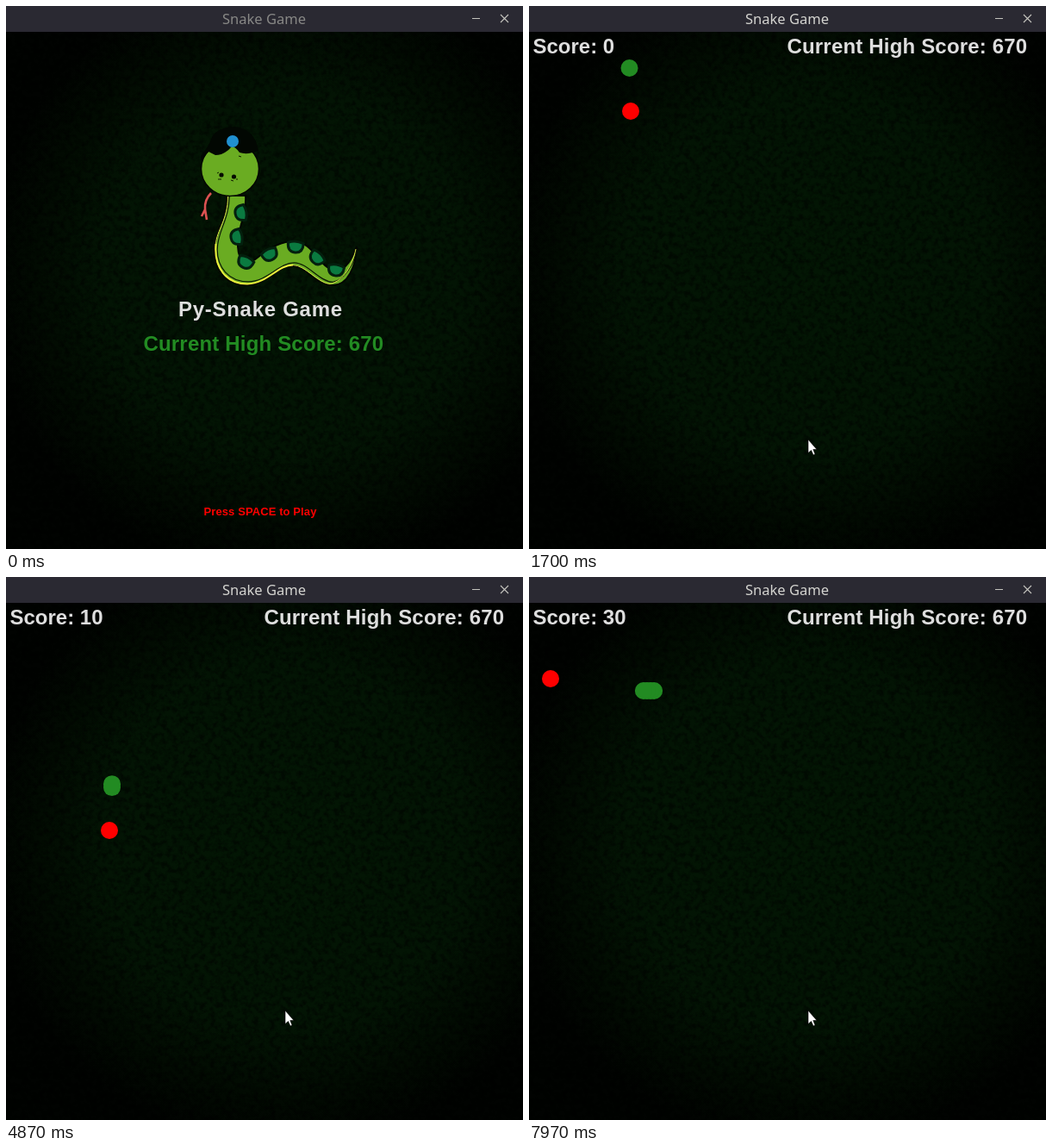
Animation of 600 by 630 pixels, one loop 8000 ms. Source, as an HTML page:

```html
<!DOCTYPE html>
<html lang="en">
<head>
<meta charset="utf-8">
<title>Snake Game</title>
<style>
  html, body { margin: 0; width: 100%; height: 100%; overflow: hidden; background: #000; }
  svg { display: block; width: 100%; height: 100%; }
  text { font: bold 24px "Liberation Sans", Arial, sans-serif; fill: #dedede; }
  #caption { font: 16.5px "Noto Sans", "Open Sans", sans-serif; }
  #prompt { font-size: 13px; letter-spacing: .1px; fill: #f00; }
  .high { letter-spacing: .18px; }
</style>
</head>
<body>
<svg viewBox="0 0 600 630" xmlns="http://www.w3.org/2000/svg">
  <defs>
    <radialGradient id="glow" gradientUnits="userSpaceOnUse" cx="325" cy="310" r="350">
      <stop offset="0" stop-color="#031604"/>
      <stop offset=".6" stop-color="#031404"/>
      <stop offset=".82" stop-color="#020b02"/>
      <stop offset="1" stop-color="#010301"/>
    </radialGradient>
    <filter id="grain" x="0" y="0" width="100%" height="100%" color-interpolation-filters="sRGB">
      <feTurbulence type="fractalNoise" baseFrequency=".16" numOctaves="4" seed="7"/>
      <feColorMatrix values="0 0 0 0 0  0 0 0 0 0  0 0 0 0 0  3 0 0 0 -1.25"/>
    </filter>
  </defs>

  <rect width="600" height="630" fill="#000"/>
  <rect y="30" width="600" height="600" fill="url(#glow)"/>
  <rect y="30" width="600" height="600" filter="url(#grain)" opacity=".5"/>

  <rect width="600" height="30" fill="#2a2932"/>
  <text id="caption" x="299.5" y="21" text-anchor="middle">Snake Game</text>
  <path d="M541 14.5h9M574 10l9 9M583 10l-9 9" fill="none" stroke="#c4c4be" stroke-width="1.1"/>

  <g id="menu">
    <path d="M238 217Q230 225 231 236L227 244M231 236L233 248" fill="none" stroke="#dc5252" stroke-width="2.6"/>
    <path d="M257 220L278 220C280 242 268 258 269 279C270 297 279 303 293 291C307 279 321 273 335 273C357 274 364 305 382 307C395 307 402 292 407 279C406 302 397 324 379 324C360 324 348 302 333 301C315 301 303 324 279 324C255 324 242 306 242 285C242 260 257 248 257 220Z" fill="#6aac22" stroke="#020602" stroke-width="2"/>
    <g fill="none">
      <path d="M258 221C258 250 244 262 244 284C244 304 257 321 280 321C302 321 316 299 333 299C349 299 362 321 378 321.500C392 319 402 301 406 284" stroke="#0c1a04" stroke-width="1.2" transform="translate(1.2 -1.2)"/>
      <path d="M243.500 276C241 304 256 322.500 280 322.500C303 322 316 300.500 333 300.500" stroke="#ecec3c" stroke-width="2"/>
      <path d="M257.500 221C257.500 248 244.500 260 243.500 276M333 300.500C348 301 361 321 376 322.500C392 319 402 301 406 282" stroke="#d8e048" stroke-width="1"/>
    </g>
    <g id="spots" fill="#0a7a40" stroke="#04200e" stroke-width="3"></g>
    <ellipse cx="260" cy="189" rx="33.500" ry="31.500" fill="#6aac22" stroke="#020602" stroke-width="1.500"/>
    <path d="M226 174Q235 164 240 150Q249 140 266 140Q289 143 293 168Q280 173 271 170Q266 163 262 163Q254 173 243 173L235 169L226 180Z" fill="#020702"/>
    <circle cx="263" cy="157" r="7" fill="#2090d0"/>
    <g fill="#060c00">
      <circle cx="250" cy="196" r="2.600"/>
      <circle cx="264.500" cy="198" r="2.600"/>
    </g>
    <path d="M246 201l4 0M261 202l3 1M270 174l3 1M245 194l2-1M267 201l2 0" stroke="#101c00"/>
    <text x="200" y="360" style="letter-spacing:.72px">Py-Snake Game</text>
    <text class="high" x="159.500" y="400" style="fill:#228b22">Current High Score: 670</text>
    <text id="prompt" x="229.500" y="591">Press SPACE to Play</text>
  </g>

  <g id="game">
    <text id="score" x="4.500" y="55"></text>
    <text class="high" x="299.500" y="55">Current High Score: 670</text>
    <g id="snake" fill="#228b22"></g>
    <circle id="food" r="10" fill="#f00"/>
  </g>

  <path id="cursor" d="M324 503V518.500L327.500 515.500L330 521L332 520L329.800 514.500H334Z" fill="#fff" stroke="#000" stroke-width=".6"/>
</svg>
<script>
const LOOP = 8000, FOCUS = 500, START = 1200, LAG = 32;

// Head turns: time, x, y
const path = [
  [1200, 55, 72], [2470, 211, 72], [2616, 229, 72], [2860, 229, 102], [3670, 129, 102],
  [3719, 123, 102], [4870, 123, 244], [5727, 123, 350], [5897, 102, 350],
  [6730, 102, 247], [7633, 102, 132], [7970, 145, 132], [8000, 149, 132]
];
// Each fruit: time it appears, x, y
const fruit = [[1200, 118, 122], [3770, 120, 294], [5165, 101, 119], [7630, 25, 118]];
// Each spot on the back: x, y, turn in degrees
const spots = [[273, 240, 80], [268, 268, 80], [278, 297, 25], [306, 288, -25], [336, 279, 5], [361, 292, 45], [383, 306, 10]];

const $ = id => document.getElementById(id);
const show = (el, on) => el.setAttribute("display", on ? "inline" : "none");

function add(parent, name, attrs) {
  const el = document.createElementNS("http://www.w3.org/2000/svg", name);
  for (const key in attrs) el.setAttribute(key, attrs[key]);
  return parent.appendChild(el);
}

function place(el, x, y) {
  el.setAttribute("cx", x);
  el.setAttribute("cy", y);
}

function headAt(t) {
  if (t <= START) return path[0].slice(1);
  const i = path.findIndex(p => p[0] > t);
  const [t0, x0, y0] = path[i - 1], [t1, x1, y1] = path[i];
  const k = (t - t0) / (t1 - t0);
  return [x0 + (x1 - x0) * k, y0 + (y1 - y0) * k];
}

for (const [x, y, turn] of spots) {
  const d = "M-9 -4Q-9 7 0 7Q9 7 9 -4Q0 -8 -9 -4Z";
  add($("spots"), "path", { d, transform: `translate(${x} ${y}) rotate(${turn})` });
}
const body = fruit.map(() => add($("snake"), "circle", { r: 10 }));

function render(t) {
  const focused = t >= FOCUS, playing = t >= START;
  $("caption").style.fill = focused ? "#d4d4d0" : "#888886";
  show($("cursor"), focused);
  show($("menu"), !playing);
  show($("game"), playing);
  if (!playing) return;

  const eaten = fruit.filter(f => f[0] <= t).length - 1;
  $("score").textContent = "Score: " + eaten * 10;
  place($("food"), fruit[eaten][1], fruit[eaten][2]);
  body.forEach((el, i) => {
    show(el, i <= eaten);
    place(el, ...headAt(t - i * LAG));
  });
}

function tick() {
  render(performance.now() % LOOP);
  requestAnimationFrame(tick);
}
tick();
</script>
</body>
</html>
```
